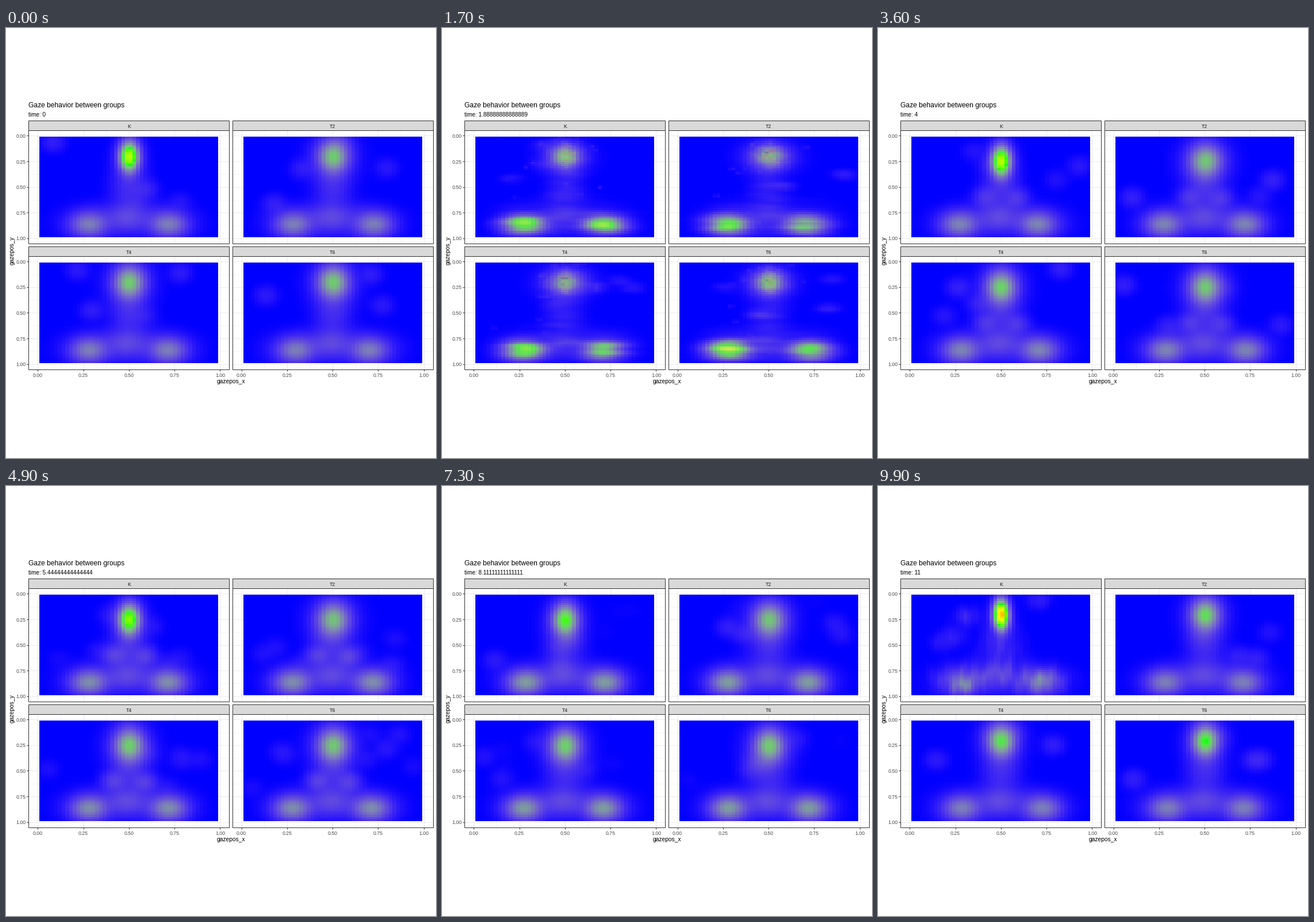
Animation, 748 px wide and 748 px high, one loop 10 s. Source, as a matplotlib script:

```python
import numpy as np
import matplotlib.pyplot as plt
from matplotlib.animation import FuncAnimation
from matplotlib.patches import Rectangle

plt.rcParams["font.family"] = "Liberation Sans"
SIZE, FRAMES, STEP = 748, 100, 9
PX = 0.72                                # points per pixel at 100 dpi
NAMES = ("K", "T2", "T4", "T6")
LEFTS, TOPS = (39.4, 393.75), (178.4, 397.3)
PANEL_W, PANEL_H, STRIP_H = 348.9, 196.2, 17.35
W, H = PANEL_W / 1.1, PANEL_H / 1.1      # pixels per data unit
N = 48
AXIS = np.arange(1, N + 1) / 49 * 100    # cell centres in percent

# Colour scale: blue, green, yellow, red, white, black in CIE Lab
STOPS = np.array([(32.3, 79.2, -107.9), (87.7, -86.2, 83.2), (97.1, -21.6, 94.5),
                  (53.2, 80.1, 67.2), (100, 0, 0), (0, 0, 0)])
XYZ_RGB = np.array([(3.2406, -1.5372, -0.4986),
                    (-0.9689, 1.8758, 0.0415),
                    (0.0557, -0.2040, 1.0570)])

# Key seconds: height of the head, strength of the hands,
# then how widely each panel's gaze spreads over the head
KEYS = np.array([(0, 20.5, 7.0, 3.1, 4.8, 4.8, 4.9),
                 (2, 20.5, 26., 5.0, 5.7, 5.6, 5.1),
                 (3, 20.5, 26., 5.0, 5.7, 5.6, 5.1),
                 (4, 25.0, 7.5, 3.1, 5.1, 4.7, 4.9),
                 (8, 26.0, 10., 4.1, 5.0, 4.9, 5.0),
                 (10, 21.5, 6.5, 2.0, 4.4, 2.6, 2.3),
                 (11, 21.0, 7.0, 2.4, 4.5, 4.4, 4.1)])


def to_lab(u):
    pos = np.linspace(0, 1, len(STOPS))
    return np.stack([np.interp(u, pos, c) for c in STOPS.T], axis=-1)


def to_rgb(lab):
    fy = (lab[..., 0] + 16) / 116
    f = np.stack([fy + lab[..., 1] / 500, fy, fy - lab[..., 2] / 200], axis=-1)
    xyz = np.where(f > 6 / 29, f ** 3, 3 * (6 / 29) ** 2 * (f - 4 / 29))
    lin = np.clip((xyz * (0.95047, 1, 1.08883)) @ XYZ_RGB.T, 0, 1)
    return np.where(lin > 0.0031308, 1.055 * lin ** (1 / 2.4) - 0.055, 12.92 * lin)


def blob(x, y, sx, sy, amp):
    gx = np.exp(-((AXIS - x) / sx) ** 2 / 2)
    gy = np.exp(-((AXIS - y) / sy) ** 2 / 2)
    return amp / 100 * np.outer(gy, gx)


def grain(rng, sx, sy):
    """Unit noise, smoothed by sx and sy cells."""
    def kernel(s):
        d = np.subtract.outer(np.arange(N), np.arange(N))
        return np.exp(-(d / s) ** 2 / 2)
    n = kernel(sy) @ rng.normal(size=(N, N)) @ kernel(sx)
    return (n - n.mean()) / n.std()


def smooth_density(rng, second, head_y, hand, spread):
    """Head, two hands and a haze between; a tight spread peaks and streaks."""
    flat = hand > 15
    hand_w, hand_h = (6.5, 4.8) if flat else (5.8, 7)
    head_h = 6.5 if flat else 7 + spread / 2
    haze = 0.6 if flat else 1
    body = blob(50, 50, 6, 14, 1.5 * haze) + blob(50, 80, 14, 9, 1.5 * haze)
    body += blob(49, 80, 6, 8, 1.8 * haze)
    for x, amp in ((28, hand), (72, hand * rng.uniform(0.6, 1) if flat else hand)):
        body += blob(x + rng.normal(0, 0.8), 86.5, hand_w, hand_h, amp)
        body += blob(x, 86, 10, 10, 0.8)
    elbow = 2.8 * np.exp(-((second - 5) / 1.5) ** 2)
    body += blob(41.5, 60, 4, 6, elbow) + blob(59, 61, 4, 6, elbow)
    for x, y in rng.uniform((5, 5), (95, 70), (4, 2)):
        body += blob(x, y, 4, 3 if flat else 6, rng.uniform(0.4, 1))
    head = blob(50.3, head_y, spread, head_h, 14 * (4.8 / spread) ** 1.75)
    head += blob(50.3, head_y, 1.7 * spread, 1.5 * head_h, 1.4)
    depth = 0.18 if flat else 0.4 * max(0, 3 - spread)
    n = grain(rng, 4, 0.8) if flat else grain(rng, 0.7, 3)
    return body * np.exp(depth * n) + head * np.exp(0.2 * depth * n)


def speckled_density(rng):
    """Raw fixations: a grainy cluster on the head with loose specks around."""
    u = blob(50.7, 20, rng.uniform(2, 2.9), 6.2, 58) * np.exp(0.42 * grain(rng, 0.5, 0.5))
    near = rng.normal((50, 17), (7.5, 8.5), (50, 2))
    far = np.column_stack([rng.normal(42, 15, 9), rng.uniform(30, 100, 9)])
    for x, y in np.vstack([near, far]):
        u += blob(x, y, 0.9, 1, rng.uniform(1.5, 6))
    return u


def build_states():
    states = []
    for second in range(12):
        head_y, hand, *spreads = [np.interp(second, KEYS[:, 0], c) for c in KEYS.T[1:]]
        row = []
        for k, spread in enumerate(spreads):
            rng = np.random.default_rng(100 * second + k)
            if second == 1:
                u = speckled_density(rng)
            else:
                u = smooth_density(rng, second, head_y, hand, spread)
            row.append(to_lab(np.clip(u, 0, 1)))
        states.append(row)
    return np.array(states)


STATES = build_states()

fig = plt.figure(figsize=(SIZE / 100, SIZE / 100), dpi=100, facecolor="white")
ax = fig.add_axes([0, 0, 1, 1])
ax.axis("off")


def text(x, y, s, px, color="black", ha="center", **kw):
    kw.setdefault("va", "baseline")
    return ax.text(x, y, s, fontsize=px * PX, color=color, ha=ha, **kw)


def line(xs, ys, color, px=1.0):
    ax.plot(xs, ys, color=color, lw=px * PX, zorder=1, solid_capstyle="butt")


def box(x, y, w, h, fill):
    ax.add_patch(Rectangle((x, y), w, h, fc=fill, ec="#333333", lw=PX, zorder=4))


def draw_panel(col, row, name):
    left, top = LEFTS[col], TOPS[row]
    right, bottom = left + PANEL_W, top + PANEL_H
    x0, y0 = left + 0.05 * W, top + 0.05 * H
    for i in range(9):
        x, y, px = x0 + i / 8 * W, y0 + i / 8 * H, 0.5 if i % 2 else 1
        line([x, x], [top, bottom], "#EBEBEB", px)
        line([left, right], [y, y], "#EBEBEB", px)
        if i % 2:
            continue
        label = f"{i / 8:.2f}"
        if row == 1:
            line([x, x], [bottom, bottom + 3], "#333333")
            text(x, bottom + 13.3, label, 8.8, "#4D4D4D")
        if col == 0:
            line([left - 3, left], [y, y], "#333333")
            text(left - 4.5, y + 3.6, label, 8.8, "#4D4D4D", ha="right")
    box(left, top, PANEL_W, PANEL_H, "none")
    box(left, top - STRIP_H, PANEL_W, STRIP_H, "#D9D9D9")
    text((left + right) / 2, top - 4.3, name, 8.8, "#1A1A1A", zorder=5)
    lo, hi = 0.5 / 49, 48.5 / 49
    return ax.imshow(np.zeros((N, N, 3)), aspect="auto", interpolation="nearest",
                     extent=(x0 + lo * W, x0 + hi * W, y0 + hi * H, y0 + lo * H),
                     zorder=3)


images = [draw_panel(k % 2, k // 2, name) for k, name in enumerate(NAMES)]
text(39, 138.3, "Gaze behavior between groups", 12, ha="left")
subtitle = text(39, 154.3, "", 10, ha="left")
text(391, 618.5, "gazepos_x", 10.3)
text(11, 387, "gazepos_y", 10.3, rotation=90, va="center")
ax.set_xlim(0, SIZE)
ax.set_ylim(SIZE, 0)


def update(i):
    second, part = divmod(i, STEP)
    after = min(second + 1, len(STATES) - 1)
    mix = part / STEP
    rgb = to_rgb(STATES[second] * (1 - mix) + STATES[after] * mix)
    for image, pixels in zip(images, rgb):
        image.set_data(pixels)
    subtitle.set_text(f"time: {i / STEP:.15g}")
    return [*images, subtitle]


anim = FuncAnimation(fig, update, frames=FRAMES, interval=100, repeat=True)
plt.show()
```
